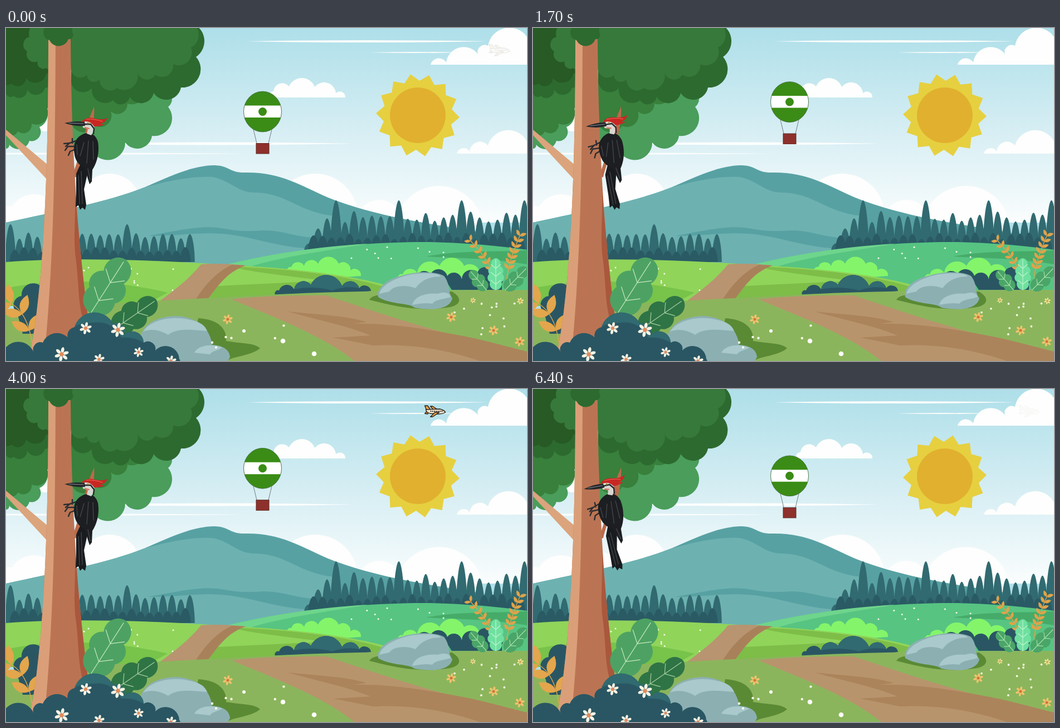
Recreate the animation shown at these times as an HTML page. Size 935 px wide and 599 px high, loop 6500 ms.

```html
<!DOCTYPE html>
<html lang="en">
<head>
<meta charset="utf-8">
<title>Meadow</title>
<style>
html, body { margin: 0; width: 100%; height: 100%; overflow: hidden; background: #b0e0ea; }
svg { display: block; width: 100vw; height: 100vh; }
</style>
</head>
<body>
<svg id="stage" viewBox="0 0 935 599" preserveAspectRatio="none" xmlns="http://www.w3.org/2000/svg"></svg>
<script>
const path = (fill, d, extra = '') => `<path fill="${fill}" d="${d}" ${extra}/>`;
const line = (color, width, d) => path('none', d, `stroke="${color}" stroke-width="${width}" stroke-linecap="round" stroke-linejoin="round"`);
const group = (content, attrs = '') => `<g ${attrs}>${content}</g>`;
const circle = (x, y, r, fill) => `<circle cx="${x}" cy="${y}" r="${r}" fill="${fill}"/>`;
const repeat = (n, make) => Array.from({ length: n }, (_, i) => make(i)).join('');
const seeded = seed => () => (seed = seed * 16807 % 2147483647) / 2147483647;

// Clockwise outline with a round bulge between neighbouring points; tail closes it with straight edges.
function scallop(fill, text, tail = '', round = 0.54) {
  const pts = text.trim().split(/\s+/).map(p => p.split(',').map(Number));
  let d = 'M' + pts[0];
  for (let i = 1; i < pts.length; i++) {
    const r = Math.hypot(pts[i][0] - pts[i - 1][0], pts[i][1] - pts[i - 1][1]) * round;
    d += `A${r} ${r} 0 0 1 ${pts[i]}`;
  }
  return path(fill, d + tail + 'Z');
}

const conifer = (x, base, h, w, fill) =>
  path(fill, `M${x - w},${base}C${x - w},${base - h * .5} ${x - w * .5},${base - h} ${x},${base - h}S${x + w},${base - h * .5} ${x + w},${base}Z`);

// Evenly spaced conifers of random height, a tall one every few trees, and a low dark row in front.
function forest({ from, to, base, low, high, tall, every, first, seed }) {
  const random = seeded(seed), step = 16.1, n = Math.round((to - from) / step);
  const back = repeat(n + 1, i => {
    const h = i % every === first ? tall : low + (high - low) * random();
    return conifer(from + i * step, base, h * Math.min(1, .25 + i * .4 + (from < 100)), 7 + h * .035, '#316a70');
  });
  return back + repeat(n, i => conifer(from + (i + .5) * step, base, low * (.4 + .25 * random()), 9.5, '#2a5a64'));
}

function scatter(n, x, y, w, h, r, seed) {
  const random = seeded(seed);
  return repeat(n, () => circle(x + w * random(), y + h * random(), r, '#f7fbe8'));
}

const flower = (x, y, r, petal, core, n = 6) => group(
  repeat(n, i => `<ellipse cy="${-r * .6}" rx="${r * .22}" ry="${r * .4}" fill="${petal}" transform="rotate(${i * 360 / n + 12})"/>`) +
  circle(0, 0, r * .28, core), `transform="translate(${x} ${y})"`);

const leaf = (x, y, angle, length, fill) =>
  path(fill, `M0,0Q${length * .45},${-length * .5} ${length},0Q${length * .45},${length * .4} 0,0Z`, `transform="translate(${x} ${y}) rotate(${angle})"`);

// Lobed leaf from base to tip with a midrib and one pair of veins per lobe.
function lobedLeaf([x1, y1], [x2, y2], half, lobes, fill, vein) {
  const length = Math.hypot(x2 - x1, y2 - y1), angle = Math.atan2(y2 - y1, x2 - x1) * 180 / Math.PI;
  const edge = (i, side) => `${length * i / lobes},${side * half * .85 * Math.sin(Math.PI * (i / lobes) ** .8)}`;
  const side = s => Array.from({ length: lobes + 1 }, (_, i) => edge(i, s));
  const veins = repeat(lobes - 1, i => {
    const x = length * (i + .7) / lobes;
    return [-1, 1].map(s => `M${x},0L${x + half * .5},${s * half * .6}`).join('');
  });
  return group(scallop(fill, [...side(-1), ...side(1).reverse()].join(' '), '', .6) +
    line(vein, 1.2, `M0,0H${length * .95}${veins}`), `transform="translate(${x1} ${y1}) rotate(${angle})"`);
}

// Curved stem with leaf pairs along its upper part.
function spray(base, tip, bend, n, size, fill) {
  const at = u => [0, 1].map(k => (1 - u) ** 2 * base[k] + 2 * u * (1 - u) * bend[k] + u * u * tip[k]);
  return line(fill, 1.4, `M${base}Q${bend} ${tip}`) + repeat(n, i => {
    const u = .3 + .7 * i / (n - 1), [x, y] = at(u), [px, py] = at(u - .02);
    const a = Math.atan2(y - py, x - px) * 180 / Math.PI;
    return leaf(x, y, a - 48, size, fill) + leaf(x, y, a + 48, size, fill);
  });
}

const white = '#fdfefd';
const streak = (x1, x2, y, h) => path(white, `M${x1},${y}Q${(x1 + x2) / 2},${y - h} ${x2},${y}Q${(x1 + x2) / 2},${y + h} ${x1},${y}Z`);

const sky = `<defs><linearGradient id="sky" x2="0" y2="1"><stop stop-color="#aedfe9"/><stop offset=".5" stop-color="#d4edf3"/><stop offset="1" stop-color="#fafdfd"/></linearGradient></defs>
  <rect width="935" height="350" fill="url(#sky)"/>` +
  streak(433, 865, 24, 4) + streak(652, 815, 44, 2) + streak(120, 622, 208, 5) + streak(-150, 430, 226, 3) +
  scallop(white, '762,66 790,62 847,47 865,32 935,16', 'V66') +
  scallop(white, '474,125 480,114 508,105 554,106 592,117 609,125') +
  scallop(white, '809,226 832,222 865,211 935,204', 'V226') +
  circle(186, 318, 56, white) + circle(50, 345, 46, white) + circle(5, 345, 25, white) + circle(110, 335, 45, white) +
  circle(555, 338, 76, white) + circle(670, 350, 41, white) + circle(777, 363, 79, white) + circle(70, 170, 16, white);

const rays = repeat(28, i => {
  const a = i * Math.PI / 14, r = i % 2 ? 62 : 75;
  return `${r * Math.sin(a)},${-r * Math.cos(a)} `;
});
const sun = group(`<polygon id="rays" points="${rays}" fill="#e6d040"/>` + circle(0, 0, 50, '#e1b02f'), 'transform="translate(739 157)"');

const mountain =
  path('#58a1a3', 'M0,350C90,330 180,314 250,286C300,264 335,248 372,247C402,247 400,261 430,260C490,259 525,281 578,305C650,334 740,350 830,363L935,385V430H0Z') +
  path('#6db2b1', 'M0,350C90,330 180,314 248,287C300,272 340,266 370,268C404,274 414,296 447,296C505,297 525,332 590,338V430H0Z') +
  path('#58a1a3', 'M255,374C315,363 345,356 380,359C410,364 425,367 462,364C500,364 525,378 560,377V396C500,400 440,373 385,370C340,367 300,375 255,374Z');

const trees =
  forest({ from: 8, to: 330, base: 421, low: 42, high: 54, tall: 68, every: 13, first: 0, seed: 7 }) +
  forest({ from: 544, to: 930, base: 400, low: 50, high: 74, tall: 90, every: 7, first: 3, seed: 11 });

const bush = '#2a5663', bushLight = '#316a70', lime = '#84f56a';
const fields =
  path('#57c482', 'M385,428C500,398 650,384 760,385C840,387 890,393 935,399V480H385Z') +
  path('#6ed58c', 'M385,428C470,407 560,393 650,388C560,403 480,414 430,432Z') +
  path('#46ab69', 'M754,411C810,400 870,403 935,400V425C870,414 815,414 754,411Z') +
  scatter(10, 620, 393, 180, 32, 1.5, 5) +
  scallop(lime, '505,440 512,430 535,428 560,424 597,424 618,436 637,446', 'Q570,452 505,440') +
  scallop(lime, '704,452 712,443 738,441 778,428 822,428 850,446', 'V460') +
  path('#90d45a', 'M0,421C120,412 270,417 430,428C540,434 640,448 700,468V500H0Z') +
  path('#7dbd48', 'M405,429C520,433 640,450 690,470V492H330L345,466C420,462 500,458 575,455C500,445 430,438 405,429Z') +
  path('#78c34a', 'M0,468C90,450 190,452 290,476L245,500H0Z') +
  scatter(10, 140, 428, 200, 45, 1.5, 9) +
  path('#b89470', 'M350,425Q385,422 430,427C392,441 378,468 355,497H268C305,470 330,450 350,425Z') +
  path('#a8815a', 'M405,426L430,427C392,441 378,468 355,497H335C352,468 375,440 405,426Z') +
  scallop(bush, '483,480 490,472 517,470 547,462 603,464 634,468 655,473', 'Q570,488 483,480') +
  scallop(bushLight, '517,470 547,462 603,464 634,468', 'Q610,463 585,472Q550,463 517,470');

const ground =
  path('#8bb55c', 'M0,515C130,495 300,490 470,480C620,472 800,471 935,471V599H0Z') +
  path('#b8946d', 'M405,488C470,481 530,481 575,481C680,516 800,558 935,582V599H625C570,553 480,520 405,488Z') +
  path('#ac845b', 'M505,510C565,516 615,518 647,529L620,532C690,530 760,542 840,558C890,570 915,577 935,582V599H848C800,585 740,588 690,576C650,571 620,562 585,557L654,553C610,535 560,526 505,510Z') +
  path('#b8946d', 'M650,572C720,566 790,578 850,599H680L700,590Z');

const shade = '#5b8a35', stone = '#8cb0b2', stoneLight = '#a9c9cc';
const rocks =
  path(shade, 'M652,489C658,478 680,480 700,480L800,474C820,485 818,500 790,503C740,510 700,501 652,489Z') +
  path(stone, 'M668,484C664,466 685,452 708,446C735,437 770,437 786,446C798,461 792,474 801,486C797,506 766,509 733,503C724,494 690,498 668,484Z') +
  path(stoneLight, 'M670,478C674,460 704,448 728,443C755,440 777,441 780,447C755,447 742,458 735,468C715,460 693,465 688,474ZM729,498C733,482 755,476 775,478C792,473 797,479 798,484C785,488 771,488 765,496C750,493 738,497 729,498Z') +
  path(shade, 'M345,522C380,524 397,540 395,563C425,568 445,566 456,576C440,590 408,590 396,599H330Z') +
  path(stone, 'M240,560C245,532 270,519 305,518C344,520 366,540 370,570C390,571 401,579 402,592L398,599H255Z') +
  path(stoneLight, 'M246,546C260,524 300,516 335,526C350,530 357,535 361,545C330,542 305,540 291,552C275,542 258,541 246,546ZM338,584C345,570 370,567 388,575C378,581 371,580 366,587Z');

const orange = '#dfa34b';
const rightPlants =
  scallop(bush, '735,452 762,442 792,446 818,452 846,440 873,438 890,460', 'V471H800L785,448') +
  spray([880, 455], [834, 383], [868, 418], 6, 12, orange) +
  spray([898, 455], [922, 374], [902, 420], 7, 13, orange) +
  lobedLeaf([862, 471], [833, 437], 12, 3, '#4aa568', '#a5dfa6') +
  lobedLeaf([896, 471], [935, 431], 13, 3, '#4aa568', '#a5dfa6') +
  lobedLeaf([879, 471], [879, 414], 14, 4, '#6fe0a0', '#bdf5cc');

const gold = ['#f0c36e', '#d5743c'];
const meadowFlowers =
  flower(398, 524, 9, ...gold) + flower(799, 520, 9, ...gold) + flower(875, 544, 9, ...gold) + flower(922, 564, 9, ...gold) +
  flower(838, 490, 5, '#f6e59a', '#d5a03c') + flower(923, 491, 6, '#f6e59a', '#d5a03c') +
  scatter(6, 370, 520, 130, 60, 2.2, 21) + circle(427, 545, 3, white) + circle(497, 563, 4.3, white) + circle(553, 586, 4.3, white) +
  scatter(12, 805, 485, 115, 78, 1.9, 33);

const foliage =
  scallop('#4a9d5a', '60,135 60,178 42,203 4,207 0,217', 'V90Z') +
  scallop('#4a9d5a', '282,110 291,142 262,194 214,206 160,228 117,200', 'V80Z') +
  scallop('#38803c', '72,90 74,145 46,172 21,186 0,187', 'V70Z') +
  scallop('#38803c', '248,100 218,136 188,150 160,176 117,170', 'V70Z') +
  scallop('#2d6a2f', '80,60 70,108 38,111 14,122 0,115', 'V40Z') +
  scallop('#2d6a2f', '328,-10 341,52 314,107 265,117 222,124 192,130 154,108 117,96', 'V0Z') +
  scallop('#275a25', '100,-10 88,42 72,82 36,90 10,100 -12,86', 'V-10Z') +
  scallop('#37793a', '328,-12 332,35 300,65 268,84 236,80 199,108 168,92 145,85 116,70', 'V-10Z') +
  scallop('#37793a', '116,45 95,62 72,72 57,60 38,42 42,16 75,-10', 'H120Z');

const trunk =
  path('#dba47c', 'M0,183L76,247L73,272L0,193Z') +
  path('#bb6a4a', 'M118,270Q126,245 136,215Q143,175 158,141Q160,165 150,205Q132,240 126,268Z') +
  path('#bb7453', 'M76,20H116C117,150 122,330 147,520L150,599H40C68,480 76,250 76,20Z') +
  path('#da9f78', 'M76,20H89C88,240 86,420 68,599H40C68,480 76,250 76,20Z') +
  path('#a9583d', 'M123,275C128,350 137,440 147,520L148,545C128,515 132,470 126,420C119,380 127,330 123,275Z') +
  scallop('#2d6a2f', '119,8 112,20 78,22 74,-4', 'H119Z');

const leftPlants =
  scallop(bush, '20,512 28,482 62,464', 'V550H30Z') +
  spray([48, 578], [10, 496], [42, 515], 3, 36, '#e3a64c');

const bigLeaves =
  lobedLeaf([152, 513], [214, 416], 33, 3, '#4da263', '#c7e8bd') +
  lobedLeaf([192, 543], [270, 489], 24, 3, '#2f7445', '#a7cfa1');

const daisy = ['#f8f4e4', '#e38a5c'];
const frontBush =
  scallop(bush, '-20,599 -5,582 50,584 66,566 117,566 123,538 192,532 212,552 247,566 268,580 311,596 312,599') +
  scallop(bushLight, '123,538 192,532 212,552 247,566', 'Q230,555 207,557Q190,526 158,530Q132,530 123,538Z') +
  flower(143, 540, 11, ...daisy) + flower(201, 543, 13, ...daisy) + flower(100, 587, 13, ...daisy) +
  flower(167, 596, 10, ...daisy) + flower(238, 583, 9, ...daisy) + flower(296, 599, 10, ...daisy);

const bird = group(
  line('#2b2d30', 2.4, 'M126,203L114,207L104,208M122,213L111,213L106,220M125,218L115,222L112,229M119,207L119,199M114,207L107,213') +
  path('#191b1e', 'M134,243L126,262L126,300L125,322L130,319L133,327L137,323L142,327L144,318L140,290L147,258Z') +
  path('#1c1e21', 'M140,190C128,195 121,205 122,220C123,238 130,246 141,252L150,281L154,276L155,255C164,242 168,222 165,205C161,191 151,187 140,190Z') +
  line('#44484d', 1.3, 'M140,206L133,230M148,203L145,243M156,204L157,236M147,253L151,273M130,265L132,317M135,258L137,316M127,210L128,228') +
  path('#d9d7d2', 'M137,172Q146,162 159,171L158,184L153,193L145,190L147,182L138,179Z') +
  path('#24272b', 'M105,171Q124,166 141,169L142,176Q125,178 105,171Z') +
  line('#8b8f93', 1, 'M113,171L139,172') +
  path('#c82722', 'M135,169Q144,158 160,163Q173,166 182,162Q178,171 169,172L177,174Q165,178 158,177Q151,165 135,169Z') +
  line('#ef6a58', 1, 'M144,164Q159,163 173,168') +
  line('#25272b', 2.4, 'M141,173L152,173L158,181L157,190') +
  line('#d96a55', 2, 'M142,179L149,181') +
  circle(147, 171, 1.6, '#e7c04d') + circle(147, 171, .8, '#111'), 'id="bird"');

const plane = group(
  path('#eda143', 'M-18,-10H-13L-7,-2H-15ZM-3,-3L-8,-9H-4L5,-3ZM-18,4L-14,0H-8L-13,5Z') +
  path('#f8e4c8', 'M-16,-3L9,-4Q17,-2 19,2Q14,5 5,5L-9,4Q-16,2 -16,-3Z') +
  path('#eda143', 'M0,2H8L-4,10H-8Z') +
  path('none', 'M-8,0H14', 'stroke-width="2" stroke-dasharray="1.8 1.5"'),
  'id="plane" stroke="#1d1d1d" stroke-width="1.3" stroke-linejoin="round"');

const balloon = group(
  line('#6f7c82', 1, 'M-16.5,32L-10.5,57M16.5,32L10.5,57') +
  '<rect x="-11.5" y="57" width="23" height="18.5" fill="#8e302b" stroke="#5f2a25"/>' +
  '<ellipse rx="34" ry="36.4" fill="#3a8c16"/>' +
  path('#fff', 'M-32.5,-11H32.5Q35,0 32.5,10.5H-32.5Q-35,0 -32.5,-11Z') +
  '<ellipse rx="34" ry="36.4" fill="none" stroke="#40643a" stroke-width=".8"/>' +
  circle(0, 0, 7.5, '#3a8c16'), 'id="balloon"');

const stage = document.getElementById('stage');
stage.innerHTML = sky + sun + mountain + trees + fields + ground + rightPlants + rocks +
  meadowFlowers + plane + balloon + foliage + leftPlants + trunk + bigLeaves + frontBush + bird;

const place = (id, transform) => document.getElementById(id).setAttribute('transform', transform);
const easeInOut = u => u < .5 ? 8 * u ** 4 : 1 - 8 * (1 - u) ** 4;

function draw(t) {
  // The sun makes a full turn in two seconds, then turns back.
  const swing = 1 - Math.abs(t % 4000 / 2000 - 1);
  place('rays', `rotate(${360 * easeInOut(swing) - 10})`);

  // One peck per second.
  place('bird', `rotate(${6.75 * (Math.cos(t * Math.PI / 500) - 1)} 140 240)`);

  // The balloon climbs steadily, then sinks ever more slowly.
  const y = t < 2600 ? 150.5 - 26.7 * t / 2600 : 156.3 - 32.5 * (1 - (t - 2600) / 3800) ** 1.9;
  place('balloon', `translate(460.5 ${y})`);

  // The plane slows down and fades out; its end runs over into the next loop.
  const flight = t < 1500 ? t + 6000 : t;
  place('plane', `translate(${892.5 - 3.42 * Math.max(0, 7.3 - flight / 1000) ** 3} 40)`);
  const fade = Math.min(1, Math.max(0, (6800 - flight) / 2700)) ** 2;
  document.getElementById('plane').setAttribute('opacity', fade);
}

const start = performance.now();
function tick(now) {
  draw(Math.floor(Math.max(0, now - start) % 6500 / 100) * 100);
  requestAnimationFrame(tick);
}
draw(0);
requestAnimationFrame(tick);
</script>
</body>
</html>
```
